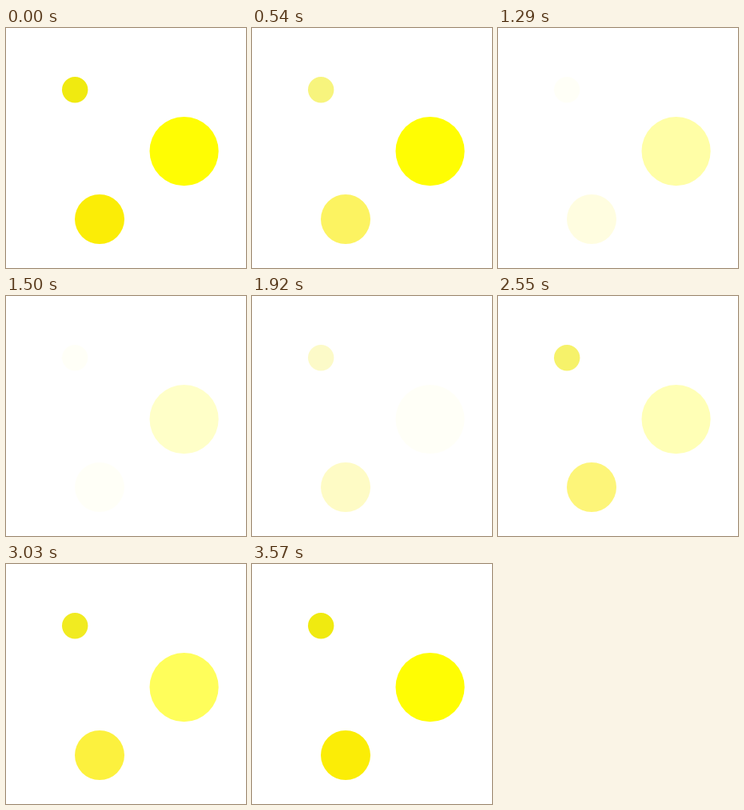
An HTML page for the animation above (3600 ms loop, 300 by 300 pixels).

```html
<!DOCTYPE html>
<html lang="en">
<head>
<meta charset="utf-8">
<title>Fading circles</title>
<style>
  html, body { margin: 0; width: 100%; height: 100%; overflow: hidden; background: #fff; }
  svg { display: block; width: 100vw; height: 100vh; }
</style>
</head>
<body>
<svg viewBox="0 0 300 300">
  <circle id="small" cx="86.2" cy="77.3" r="16.2" fill="#f0ea10"/>
  <circle id="medium" cx="117" cy="239" r="31" fill="#fbed06"/>
  <circle id="large" cx="222.6" cy="154.1" r="43.1" fill="#fffd03"/>
</svg>
<script>
const LOOP = 3600;
const FAINTEST = 0.03;

// Times in ms: solid until hold, fading along the line fall, returning along rise.
const fades = {
  small: { hold: 0, fall: [0, 1180], rise: [1560, 3150] },
  medium: { hold: 0, fall: [0, 1470], rise: [1450, 3500] },
  large: { hold: 600, fall: [300, 1830], rise: [2170, 3500] }
};

const progress = (t, [from, to]) => Math.min(1, Math.max(0, (t - from) / (to - from)));

function opacityAt(t, { hold, fall, rise }) {
  if (t < hold) return 1;
  return Math.max(FAINTEST, 1 - progress(t, fall), progress(t, rise));
}

const start = performance.now();

function draw() {
  const t = (performance.now() - start) % LOOP;
  for (const [id, fade] of Object.entries(fades)) {
    document.getElementById(id).setAttribute("opacity", opacityAt(t, fade));
  }
  requestAnimationFrame(draw);
}
draw();
</script>
</body>
</html>
```
